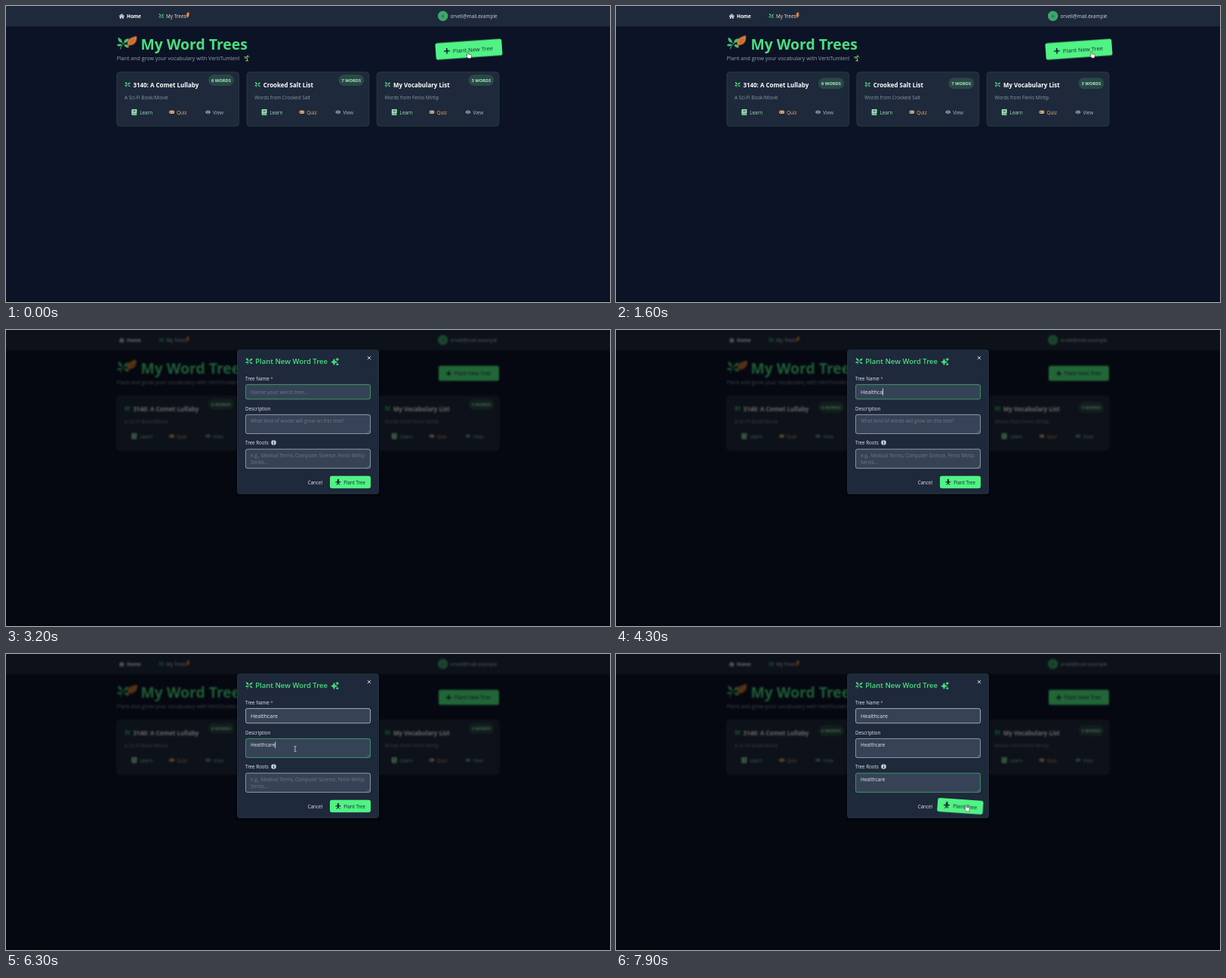
Animation, 800 px wide and 393 px high, one loop 8 s. Source, as an HTML page:

```html
<!DOCTYPE html>
<html lang="en">
<head>
<meta charset="utf-8">
<title>Word trees</title>
<style>
  html, body { margin: 0; width: 100%; height: 100%; overflow: hidden; background: #0c1326; }
  svg.stage { display: block; width: 800px; height: 393px; }
  text { font: 6.4px "Open Sans", "Noto Sans", sans-serif; fill: #e2e8f0; white-space: pre; }
  .h1 { font-size: 19.35px; font-weight: 700; fill: #4ade80; }
  .h2 { font-size: 9.5px; font-weight: 600; fill: #4ade80; }
  .h3 { font-size: 7.95px; font-weight: 700; fill: #fff; }
  .lead { font-size: 7.05px; fill: #98a2b3; }
  .bold { font-weight: 700; fill: #fff; }
  .note { font-size: 6.35px; fill: #8a95a6; }
  .tag { font-size: 5.7px; font-weight: 700; fill: #a9ecc4; }
  .label { font-size: 6.25px; font-weight: 500; }
  .big { font-size: 7.1px; }
  .hint { fill: #6d7889; }
  .small { font-size: 6.3px; }
  .ink { fill: #1a2636; font-weight: 500; }
  .dark { color: #1a2636; }
  .green { color: #4ade80; }
  .mint { color: #9ae6b4; fill: #9ae6b4; }
  .amber { color: #e3b381; fill: #f2b06a; }
  .sky { color: #93b9c9; fill: #a7bac9; }
  .panel { fill: #1e293b; }
  .field { fill: #364356; stroke: #aab5c4; stroke-width: .8; }

  /* one loop is 8 s, so 1% is 80 ms */
  .page, .shade, .modal, .inner, .plant, .save, .badge, .cursor, .cursor *, .field, .mark {
    animation: 8s ease-out infinite;
  }
  .page { animation-name: blur; }
  .shade { animation-name: fade; }
  .modal { animation-name: open; transform-origin: 400px 122px; }
  .inner { animation-name: grow; transform-origin: 400px 122px; }
  .plant { animation-name: leave; transform-origin: 613px 57.5px; }
  .save { animation-name: enter; transform-origin: 456px 202px; }
  .badge { animation-name: bob; animation-timing-function: ease-in-out; }
  .cursor { animation-name: move; animation-timing-function: ease-in-out; }
  .cursor *, .mark { animation-timing-function: step-end; }
  .hand { animation-name: hand; }
  .arrow { animation-name: arrow; }
  .beam { animation-name: beam; }
  .mark { animation-name: mark; }
  #name { animation-name: focusName; }
  #desc { animation-name: focusDesc; }
  #roots { animation-name: focusRoots; }
  .sway { animation: sway 2s ease-in-out infinite; }

  @keyframes blur { 0%, 22.5% { filter: blur(0); } 25%, 100% { filter: blur(1.25px); } }
  @keyframes fade { 0%, 22.5% { opacity: 0; } 25%, 100% { opacity: .58; } }
  @keyframes open {
    0%, 22.5% { opacity: 0; transform: scale(.968); }
    24.5% { opacity: 1; }
    26%, 100% { opacity: 1; transform: none; }
  }
  @keyframes grow { 0%, 22.5% { opacity: 0; transform: scale(.88); } 26%, 100% { opacity: 1; transform: none; } }
  @keyframes leave { 0%, 21% { transform: scale(1.1) rotate(-4deg); } 23.5%, 100% { transform: scale(1) rotate(0deg); } }
  @keyframes enter { 0%, 95.5% { transform: scale(1) rotate(0deg); } 98%, 100% { transform: scale(1.12) rotate(4deg); } }
  /* 3 s bob, cut off by the end of the loop */
  @keyframes bob {
    0%, 37.5%, 75% { transform: translateY(0); }
    18.75%, 56.25%, 93.75% { transform: translateY(4.17px); }
    100% { transform: translateY(3.2px); }
  }
  @keyframes sway { 0%, 100% { transform: rotate(0deg); } 25% { transform: rotate(5deg); } 75% { transform: rotate(-5deg); } }
  @keyframes move {
    0% { transform: translate(611px, 61px); }
    6% { transform: translate(648px, 60px); }
    12.5%, 20% { transform: translate(629px, 60.5px); }
    23.75% { transform: translate(564px, 78.5px); }
    30%, 36% { transform: translate(440px, 82px); }
    68% { transform: translate(430px, 116px); }
    73%, 82% { transform: translate(383px, 126px); }
    86.5%, 91% { transform: translate(383px, 172px); }
    96.5%, 100% { transform: translate(463px, 200.5px); }
  }
  @keyframes hand { 0% { opacity: 1; } 21% { opacity: 0; } 95.5%, 100% { opacity: 1; } }
  @keyframes arrow { 0% { opacity: 0; } 21% { opacity: 1; } 28.2% { opacity: 0; } 92.5% { opacity: 1; } 95.5%, 100% { opacity: 0; } }
  @keyframes beam { 0% { opacity: 0; } 28.2% { opacity: 1; } 36% { opacity: 0; } 68% { opacity: 1; } 92.5%, 100% { opacity: 0; } }
  @keyframes mark { 0% { opacity: 0; } 64% { opacity: 1; } 73%, 100% { opacity: 0; } }
  @keyframes focusName { 0%, 25% { stroke: #aab5c4; } 27.5%, 73% { stroke: #45b071; } 75.5%, 100% { stroke: #c3ccd8; } }
  @keyframes focusDesc { 0%, 73% { stroke: #aab5c4; } 75.5%, 87% { stroke: #45b071; } 89.5%, 100% { stroke: #aab5c4; } }
  @keyframes focusRoots { 0%, 87% { stroke: #aab5c4; } 89%, 100% { stroke: #45b071; } }
</style>
</head>
<body>
<svg class="stage" viewBox="0 0 800 393" xmlns="http://www.w3.org/2000/svg">
  <defs>
    <symbol id="sprig" viewBox="0 0 24 24">
      <g fill="currentColor">
        <path d="M10 11C4 10 2 6 3 1C8 3 11 6 10 11Z"/>
        <path d="M14 11C13 6 17 3 23 3C22 8 19 11 14 11Z"/>
        <path d="M10 14C7 19 3 18 0 16C2 13 6 12 10 14Z"/>
        <path d="M14 15C18 13 22 15 23 20C18 20 15 19 14 15Z"/>
      </g>
      <path d="M4 3L13 13L21 5M13 13C10 15 8 18 7 23" fill="none" stroke="currentColor" stroke-width="1.4"/>
    </symbol>
    <symbol id="autumn" viewBox="0 0 24 24">
      <path d="M4 19C2 9 9 3 23 1C23 12 18 20 8 19L2 24L1 23Z" fill="#e8853a"/>
      <path d="M4 20L20 4M9 15L10 8M13 11L14 5M10 15L17 14M14 11L20 9" fill="none" stroke="#a94f22" stroke-width="1.2"/>
    </symbol>
    <symbol id="palm" viewBox="0 0 24 24">
      <path d="M11 8C14 13 13 18 11 23H16C17 17 16 12 13 8Z" fill="#8fae4a"/>
      <path d="M12 8C6 3 2 6 1 11C5 8 9 8 12 9C16 6 20 7 23 12C23 5 18 2 12 8Z" fill="#7cc05a"/>
      <path d="M12 8C8 9 6 12 6 15C10 14 12 12 12 8ZM12 7C12 3 15 1 19 2C18 5 15 7 12 7Z" fill="#a9c94c"/>
      <path d="M5 23Q13 18 21 23Z" fill="#e8c255"/>
    </symbol>
    <symbol id="home" viewBox="0 0 24 24">
      <path d="M12 2L24 13L22 15L12 6L2 15L0 13ZM4 15L12 8L20 15V23H14V16H10V23H4Z" fill="#e2e8f0"/>
    </symbol>
    <symbol id="book" viewBox="0 0 24 24">
      <path d="M5 0H22V17H20V21H22V24H5Q1 24 1 20V4Q1 0 5 0Z" fill="currentColor"/>
      <path d="M7 6H17M7 10H17M5 19H19" stroke="#1e293b" stroke-width="2"/>
    </symbol>
    <symbol id="pad" viewBox="0 0 24 24">
      <rect y="5" width="24" height="14" rx="7" fill="currentColor"/>
      <path d="M4 12H10M7 9V15M15 13.500H18M17 10.500H20" stroke="#1e293b" stroke-width="2"/>
    </symbol>
    <symbol id="eye" viewBox="0 0 24 24">
      <path d="M0 12Q12-4 24 12Q12 28 0 12Z" fill="currentColor"/>
      <circle cx="12" cy="12" r="5.500" fill="#1e293b"/><circle cx="12" cy="12" r="3" fill="currentColor"/>
    </symbol>
    <symbol id="shoot" viewBox="0 0 24 24">
      <path d="M12 0L16 5L14 9L22 11L20 15L15 13V18L20 23H16L12 19L7 24H4L9 17V13L3 16L1 12L10 9L8 5Z" fill="currentColor"/>
    </symbol>
    <symbol id="spark" viewBox="0 0 24 24">
      <path d="M9 3L12 10L19 13L12 16L9 23L6 16L0 13L6 10ZM19 0L20.500 3.500L24 5L20.500 6.500L19 10L17.500 6.500L14 5L17.500 3.500ZM19 16L20.500 18.500L23 20L20.500 21.500L19 24L17.500 21.500L15 20L17.500 18.500Z" fill="currentColor" stroke="currentColor"/>
    </symbol>
  </defs>

  <g class="page">
    <rect x="-10" y="-10" width="820" height="413" fill="#0c1326"/>
    <rect class="panel" x="-10" y="-10" width="820" height="36.500"/>
    <path d="M-10 26.500H810" stroke="#2a3547" stroke-width=".6"/>
    <use href="#home" x="149.500" y="9.500" width="7.500" height="7.500"/>
    <text class="bold" x="160" y="15.900">Home</text>
    <use class="green" href="#sprig" x="202" y="9.800" width="7.200" height="7.200"/>
    <text x="212" y="15.900">My Trees</text>
    <path class="sway" style="transform-origin:241px 16px" d="M240 16C238 12 239 9 242 8C243 11 243 14 240.500 15Z" fill="#e8853a"/>
    <circle cx="578.700" cy="13.200" r="6.700" fill="#3fa56c"/>
    <text x="578.700" y="15" text-anchor="middle" style="font-size:5.600px;fill:#15261f">o</text>
    <text x="588.500" y="15.900" style="fill:#cfd6e0">orveli@mail.example</text>

    <use class="green" href="#sprig" x="146.500" y="41" width="17" height="17" opacity=".85"/>
    <use class="sway" style="transform-origin:160px 55px" href="#autumn" x="158.500" y="39.500" width="15.500" height="15.500"/>
    <text class="h1" x="178.500" y="58">My Word Trees</text>
    <text class="lead" x="146.700" y="72">Plant and grow your vocabulary with VerbTumlen!</text>
    <use href="#palm" x="314.500" y="65" width="8.500" height="8.500"/>

    <g class="plant">
      <rect x="573" y="47.500" width="80" height="20" rx="2.600" fill="#50f384"/>
      <path d="M583 57.700H590M586.500 54.200V61.200" stroke="#1a2636" stroke-width="1.500"/>
      <text class="ink" x="593.800" y="60.200" style="font-size:6.950px">Plant New Tree</text>
    </g>
    <g id="cards"></g>
    <path d="M-10 392.500H810" stroke="#060913"/>
  </g>

  <rect class="shade" width="800" height="393"/>

  <g class="modal">
    <rect x="304" y="26" width="192" height="196" rx="5" opacity=".22"/>
    <rect class="panel" x="306.700" y="26.700" width="186.600" height="190.600" rx="2.600" stroke="#33445a" stroke-width=".7"/>
    <g class="inner">
      <use class="green" href="#sprig" x="317" y="36.500" width="10" height="10"/>
      <text class="h2" x="330.200" y="45.400">Plant New Word Tree</text>
      <use class="green" href="#spark" x="430.500" y="36.800" width="10.500" height="10.500"/>
      <path d="M478.800 34.800L483.200 39.200M483.200 34.800L478.800 39.200" stroke="#e2e8f0" stroke-width=".9"/>

      <text class="label" x="317" y="66.500">Tree Name <tspan fill="#c58b8b">*</tspan></text>
      <rect class="field" id="name" x="317.400" y="72.400" width="165.200" height="19.400" rx="2.500"/>
      <rect class="mark" x="324" y="77" width="36.200" height="10.500" fill="#718096"/>
      <text class="big hint" x="324" y="84.800">Name your word tree...</text>
      <text class="big" x="324" y="84.800" id="nameText"></text>

      <text class="label" x="317" y="106.500">Description</text>
      <rect class="field" id="desc" x="317.400" y="112.400" width="165.200" height="25.200" rx="2.500"/>
      <text class="hint" x="324" y="123.100">What kind of words will grow on this tree?</text>
      <text x="324" y="123.100" id="descText"></text>

      <text class="label" x="317" y="152.400">Tree Roots</text>
      <circle cx="354.500" cy="149.500" r="3.300" fill="#c3ccd8"/>
      <path d="M354.500 147.300V148.300M354.500 149V151.700" stroke="#1e293b" stroke-width="1"/>
      <rect class="field" id="roots" x="317.400" y="158.200" width="165.200" height="25.400" rx="2.500"/>
      <text class="small hint" x="324" y="169">e.g., Medical Terms, Computer Science, Fenlo Mirtip<tspan x="324" y="178.200">Series...</tspan></text>
      <text x="324" y="169" id="rootsText"></text>
      <path d="M478.500 136.500L481.500 133.500M480.300 136.500L481.500 135.300M478.500 182.500L481.500 179.500M480.300 182.500L481.500 181.300" stroke="#8492a5" stroke-width=".5"/>
      <rect id="caret" width=".7" fill="#fff"/>

      <text class="label" x="399.700" y="204.700">Cancel</text>
      <g class="save">
        <rect x="429" y="193.800" width="54" height="16.400" rx="2.600" fill="#50f384"/>
        <use class="dark" href="#shoot" x="435.800" y="197.300" width="8.300" height="8.800"/>
        <text class="ink" x="447.200" y="204.700" style="font-size:6.200px">Plant Tree</text>
      </g>
    </g>
  </g>

  <g class="cursor" stroke-linejoin="round">
    <path class="hand" d="M0 0Q1-.8 1.600.4V3L5 3.800Q5.800 4.200 5.500 5.500L4.700 8.600H1.200L-1.500 5.200Q-1.600 4 0 4.800Z" fill="#fff" stroke="#111" stroke-width=".5"/>
    <path class="arrow" d="M0 0V7L1.600 5.500L2.700 8L3.900 7.500L2.800 5H5Z" fill="#fff" stroke="#111" stroke-width=".5"/>
    <path class="beam" d="M-1.500-3.500Q0-3.500 0-2.800Q0-3.500 1.500-3.500M0-2.800V2.800M-1.500 3.500Q0 3.500 0 2.800Q0 3.500 1.500 3.500" fill="none" stroke="#e8ecf2" stroke-width=".7"/>
  </g>
</svg>

<script>
  const LOOP = 8000, WORD = "Healthcare";
  const el = id => document.getElementById(id);

  const cards = [
    ["3140: A Comet Lullaby", "A Sci-Fi Book/Movie", 6],
    ["Crooked Salt List", "Words from Crooked Salt", 7],
    ["My Vocabulary List", "Words from Fenlo Mirtip", 3]
  ];
  const action = (icon, tone, x, label) =>
    `<use class="${tone}" href="#${icon}" x="${x}" y="${icon === "book" ? 136.7 : 137.3}" width="${icon === "book" ? 8 : 7.2}" height="${icon === "book" ? 8.4 : 7.2}"/>
     <text class="${tone}" x="${x + (icon === "book" ? 11.2 : 10)}" y="143.700">${label}</text>`;

  el("cards").innerHTML = cards.map(([title, note, count], i) => `
    <g transform="translate(${i * 172.2} 0)">
      <rect class="panel" x="146.800" y="87.800" width="161.800" height="71.600" rx="4" stroke="#2b443f" stroke-width=".8"/>
      <use class="green" href="#sprig" x="157" y="100.500" width="8" height="8"/>
      <text class="h3" x="168.500" y="108.200">${title}</text>
      <g class="badge">
        <rect x="268" y="91" width="34" height="15" rx="7.500" fill="#2a4846"/>
        <text class="tag" x="285" y="100.700" text-anchor="middle">${count} WORDS</text>
      </g>
      <text class="note" x="157" y="123.600">${note}</text>
      ${action("book", "mint", 166, "Learn")}
      ${action("pad", "amber", 216, "Quiz")}
      ${action("eye", "sky", 264, "View")}
    </g>`).join("");

  // focus: field gains the caret; type: first letter; step: ms per letter (0 = pasted)
  const fields = [
    { text: el("nameText"), focus: 1580, type: 3400, step: 115, y: 77.3, h: 9.6 },
    { text: el("descText"), focus: 5840, type: 6240, step: 0, y: 116.5, h: 8.6 },
    { text: el("rootsText"), focus: 6960, type: 7280, step: 0, y: 162.3, h: 8.6 }
  ];
  const caret = el("caret");
  let start;

  function typed(f, t) {
    if (t < f.type) return 0;
    return f.step ? Math.min(WORD.length, 1 + Math.floor((t - f.type) / f.step)) : WORD.length;
  }

  function draw(now) {
    start ??= now;
    const t = (now - start) % LOOP;
    let active;
    for (const f of fields) {
      const n = typed(f, t);
      f.text.textContent = WORD.slice(0, n);
      f.text.previousElementSibling.style.visibility = n ? "hidden" : "visible";
      if (t >= f.focus) active = f;
    }
    const selected = t >= 5120 && t < 5840;
    caret.style.visibility = "hidden";
    if (active && !selected) {
      const since = t < active.type ? active.focus : Math.min(t, active.type + 9 * active.step);
      if ((t - since) % 1060 < 530) caret.style.visibility = "visible";
      caret.setAttribute("x", 324.1 + active.text.getComputedTextLength());
      caret.setAttribute("y", active.y);
      caret.setAttribute("height", active.h);
    }
    requestAnimationFrame(draw);
  }
  requestAnimationFrame(draw);
</script>
</body>
</html>
```
